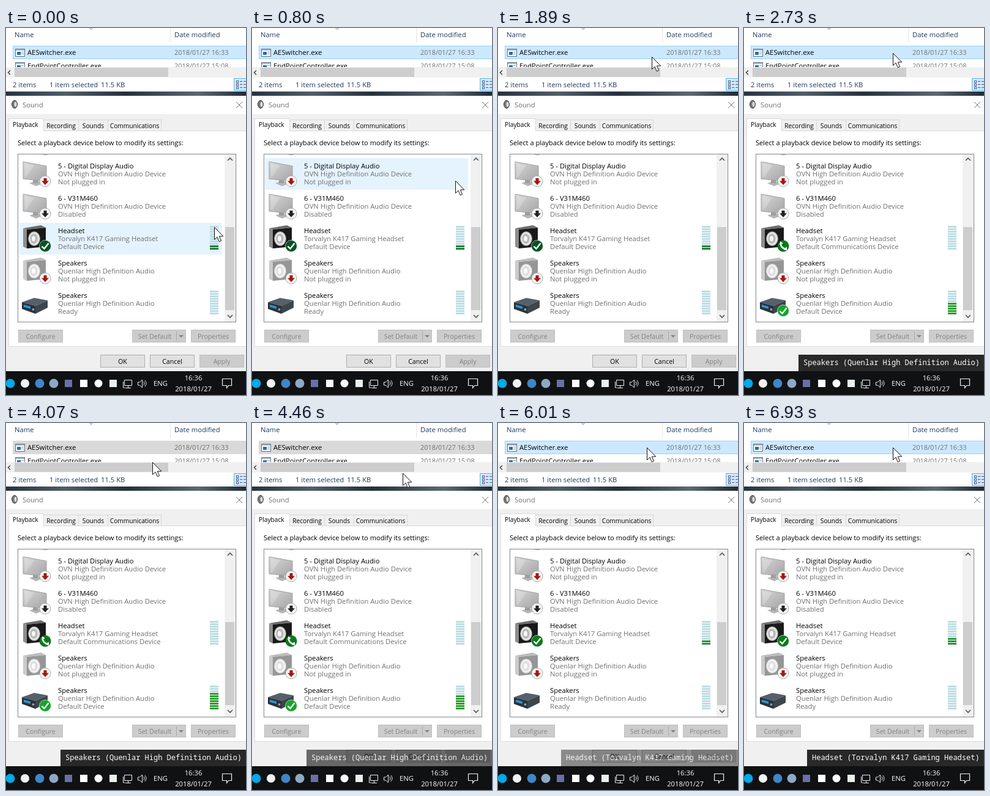
These frames come from a looping animation (392x601 px, 7080 ms). An HTML page:

```html
<!DOCTYPE html>
<html lang="en">
<head>
<meta charset="utf-8">
<title>Sound devices</title>
<style>
html, body { margin: 0; width: 100%; height: 100%; overflow: hidden; background: #f0f0f0; }
svg { display: block; }
text { font: 11.25px "Open Sans", "Noto Sans", sans-serif; fill: #000; }
.gray { fill: #707070; }
.status { fill: #1e395b; }
.small { font-size: 10.6px; }
.tab { font-size: 10.2px; }
.date { font-size: 10.9px; }
.prompt { font-size: 11.1px; }
.mid { text-anchor: middle; }
.off { fill: #838383; }
.light { fill: #fff; }
.mono { font: 500 12px "Noto Sans Mono", "DejaVu Sans Mono", monospace; fill: #fff; }
</style>
</head>
<body>
<svg id="stage" width="392" height="601" viewBox="0 0 392 601"></svg>
<script>
const LOOP = 7080, TO_SPEAKERS = 2560, TO_HEADSET = 5920;
const HEADSET = "Torvalyn K417 Gaming Headset", SPEAKERS = "Quenlar High Definition Audio";
const DISPLAY = "OVN High Definition Audio Device";

const rect = (x, y, w, h, fill, more = "") =>
  `<rect x="${x}" y="${y}" width="${w}" height="${h}" fill="${fill}" ${more}/>`;
const box = (x, y, w, h, fill, stroke, more = "") =>
  rect(x + .5, y + .5, w - 1, h - 1, fill, `stroke="${stroke}" ${more}`);
const path = (d, fill, stroke = "none", more = "") =>
  `<path d="${d}" fill="${fill}" stroke="${stroke}" ${more}/>`;
const dot = (x, y, r, fill, more = "") => `<circle cx="${x}" cy="${y}" r="${r}" fill="${fill}" ${more}/>`;
const oval = (x, y, rx, ry, fill, more = "") =>
  `<ellipse cx="${x}" cy="${y}" rx="${rx}" ry="${ry}" fill="${fill}" ${more}/>`;
const text = (x, y, s, cls = "", id = "") => `<text x="${x}" y="${y}" class="${cls}" id="${id}">${s}</text>`;
const group = (s, more = "") => `<g ${more}>${s}</g>`;
const button = (x, y, w, label, off, labelX = x + w / 2) =>
  box(x, y, w, 21, off ? "#ccc" : "#e1e1e1", off ? "#bfbfbf" : "#adadad") +
  text(labelX, y + 15, label, "small mid" + (off ? " off" : ""));

// Device icons, relative to the top of their row
const monitor = path("M38 41l13-4 11 4-13 5z", "#b5b5b5") + path("M44 33h8v8h-8z", "#9d9d9d") +
  path("M28 6L66 13V38L28 34z", "url(#screen)", "#a0a0a0") +
  path("M31 9L46 12 33 31 31 31z", "#fff", "none", 'opacity=".22"');
const speaker = faded => group(
  path("M28 9L57 4 65 8 34 11z", "#6d6d6d") + path("M28 9L34 11V42L28 39z", "#8d8d8d") +
  path("M34 11L65 8V39L34 42z", "#191919") +
  oval(46, 26, 9.5, 11.5, "#e4e4e4", 'stroke="#888"') + oval(45.500, 26, 6, 8, "#b8b8b8") + oval(45, 26, 3, 4.500, "#f5f5f5"),
  faded ? 'opacity=".45"' : "");
const receiver = path("M26 24L46 17 68 21 48 30z", "#56606a") + path("M26 24L48 30V43L26 35z", "#2a323a") +
  path("M48 30L68 21V33L48 43z", "#3d454d") + path("M29 28L40 31V35L29 32z", "#2f93cf") + dot(44.5, 36, 2, "#8fa0ac");
const arrowBadge = color => dot(64, 38, 9, "#f6f6f6", 'stroke="#a9a9a9"') +
  path("M61.5 33h5v4.5h3.5L64 44 58 37.5h3.5z", color);
const checkBadge = id => group(dot(64, 38, 9.5, "currentColor", 'stroke="#fff" stroke-width=".6"') +
  path("M58.5 38.5l4 4 7-9", "none", "#fff", 'stroke-width="2.4"'), `id="${id}"`);
const phoneBadge = group(dot(64, 38, 9.5, "#087a1c") +
  path("M60 34q0 7 8 9", "none", "#fff", 'stroke-width="2.6"') +
  path("M59 36l1-4 3 2M65 43l4 1 0-4", "none", "#fff", 'stroke-width="2"'), 'id="phone"');

const rowY = i => 213 + 53 * i;
const device = (i, icon, name, model, state) =>
  group(icon, `transform="translate(0 ${rowY(i)})"`) + text(85, rowY(i) + 17, name) +
  text(85, rowY(i) + 30, model, "gray") + text(85, rowY(i) + 43, state, "gray", "state" + i);
const meter = (id, y) =>
  group([...Array(10).keys()].map(k => rect(333, y + 4 * k, 14, 3, "#bcdde3")).join(""), `id="${id}"`);
const file = (y, name, date) =>
  box(15, y - 10, 16, 13, "#fff", "#5f7080") + rect(16, y - 9, 14, 2, "#aebbc4") + rect(18, y - 5, 6, 5, "#1c70b8") +
  rect(25, y - 5, 4, 1, "#999") + rect(25, y - 2, 4, 1, "#999") + text(35, y, name) + text(275, y, date, "gray date");

const explorer = rect(0, 0, 392, 104, "#fff") +
  path("M135.500 -1l3.500 3.500 3.500-3.500", "none", "#777") +
  text(14, 15, "Name", "status") + text(275, 15, "Date modified", "status") +
  rect(268, 0, 1, 24, "#e5e5e5") +
  box(11, 29, 384, 22, "#cce8ff", "#99d1ff", 'id="fileRow"') +
  rect(11, 51, 381, 14, "#e5f3ff", 'id="nextRow"') +
  file(44, "AESwitcher.exe", "2018/01/27 16:33") + file(66, "EndPointController.exe", "2018/01/27 15:08") +
  rect(0, 64, 392, 40, "#fff") + rect(0, 64, 392, 17, "#f0f0f0") +
  rect(14, 65, 251, 15, "#cdcdcd") + path("M7 69.5L3.5 73 7 76.5", "none", "#444", 'stroke-width="1.5"') +
  text(11, 97, "2 items", "status") + text(71, 97, "1 item selected", "status") + text(155, 97, "11.5 KB", "status") +
  box(372, 82, 24, 21, "#cce8ff", "#5fb2ec") +
  [87, 92, 97].map(y => box(376, y - 1, 4, 4, "#fff", "#557") + rect(382, y, 4, 1, "#557") + rect(388, y, 4, 1, "#557")).join("") +
  rect(0, 104, 392, 7, "url(#desk)");

const dialog = rect(0, 111, 392, 451, "#f0f0f0") + rect(0, 111, 392, 30, "#fff") +
  oval(14, 125, 4.5, 6.5, "#777", 'stroke="#444"') + oval(15.5, 125, 2, 4, "#ddd") +
  text(27, 130, "Sound", "gray") + path("M376 121l10 10m0-10l-10 10", "none", "#777") +
  box(4, 168, 392, 354, "#fff", "#dcdcdc") +
  [[61, 58, "Recording"], [118, 49, "Sounds"], [166, 88, "Communications"]].map(([x, w, s]) =>
    box(x, 150, w, 19, "#f0f0f0", "#d9d9d9") + text(x + w / 2, 164, s, "tab mid")).join("") +
  path("M4.5 170V148.5H61.5V169", "#fff", "#d9d9d9") + text(11, 162, "Playback", "tab") +
  text(19, 192, "Select a playback device below to modify its settings:", "prompt") +
  box(19, 206, 357, 276, "#fff", "#828790") +
  group(dot(64, 199, 9, "#f6f6f6", 'stroke="#a9a9a9"'), 'clip-path="url(#list)"') +
  rect(21, 0, 332, 52, "#e5f3ff", 'id="hover"') +
  device(0, monitor + arrowBadge("#a8140f"), "5 - Digital Display Audio", DISPLAY, "Not plugged in") +
  device(1, monitor + arrowBadge("#222"), "6 - V31M460", DISPLAY, "Disabled") +
  device(2, speaker() + checkBadge("headsetCheck") + phoneBadge, "Headset", HEADSET, "") +
  device(3, speaker(true) + arrowBadge("#a8140f"), "Speakers", SPEAKERS, "Not plugged in") +
  device(4, receiver + checkBadge("speakerCheck"), "Speakers", SPEAKERS, "") +
  meter("headsetMeter", 324) + meter("speakerMeter", 430) +
  rect(357, 207, 18, 274, "#f0f0f0") + rect(358, 326, 15, 136, "#cdcdcd") +
  path("M362 217l4-4 4 4M362 470l4 4 4-4", "none", "#555", 'stroke-width="1.7"') +
  button(20, 494, 73, "Configure", true) + button(206, 494, 88, "Set Default", true, 243) +
  rect(278, 497, 1, 15, "#aaa") + path("M282 503h8l-4 4z", "#838383") + button(302, 494, 73, "Properties", true) +
  button(154, 535, 73, "OK") + button(235, 535, 73, "Cancel") + button(316, 535, 73, "Apply", true);

// Apps in the taskbar are plain dots and squares
const taskbar = rect(0, 562, 392, 39, "#101113") +
  dot(7, 582, 7.5, "#00a9e8") + dot(31, 582, 7, "#f2f2f2") + dot(55, 582, 7.5, "#3f86c6") + dot(78, 582, 7.5, "#8da9c4") +
  rect(96, 576, 12, 12, "#6a6fa8") + rect(121, 576, 12, 12, "#fff") + dot(151, 582, 6.5, "#fff") + rect(169, 576, 12, 12, "#e8f2ea") +
  path("M193.5 576.5h12v9h-12zM199.5 586v3M195 589.5h9M191.5 579v10h3", "none", "#eee") +
  path("M215.5 580h3l4-4v13l-4-4h-3z", "none", "#eee") +
  path("M225 579q2 3 0 6M227 577q4 5 0 10", "none", "#eee") +
  text(241, 586, "ENG", "light") + text(306, 577, "16:36", "light mid") + text(306, 595, "2018/01/27", "light mid") +
  path("M353.5 574.5h15v11h-5l-3 4v-4h-7z", "none", "#f2f2f2", 'stroke-width="1.2"');

const toast = group(rect(0, 535, 392, 27, "#1f1f1f", 'id="toastBox" opacity=".95"') +
  text(0, 552, "", "mono", "toastText"), 'id="toast"');
const cursor = path("M0 0V20L4.6 15.7 7.7 23.3 11 21.9 7.9 14.5H14.3z", "#fff", "#111", 'id="cursor"');

document.getElementById("stage").innerHTML = `<defs>
  <linearGradient id="screen" x2="1" y2="1"><stop stop-color="#d8d8d8"/><stop offset="1" stop-color="#a4a4a4"/></linearGradient>
  <linearGradient id="desk"><stop stop-color="#27333f"/><stop offset=".25" stop-color="#515d69"/><stop offset=".5" stop-color="#24303d"/><stop offset=".8" stop-color="#5c6872"/><stop offset="1" stop-color="#202b36"/></linearGradient>
  <clipPath id="list">${rect(20, 207, 337, 274, "#fff")}</clipPath></defs>` +
  explorer + dialog + taskbar + toast + cursor;
const $ = id => document.getElementById(id);

// [time, x, y] of the pointer tip and [time, lit bars] of each meter
const cursorKeys = [[0, 340, 326], [430, 340, 326], [800, 332, 250], [1120, 315, 154], [1810, 254, 52], [1890, 251, 47],
  [2130, 243, 41], [3840, 243, 41], [4070, 239, 64], [4460, 246, 82], [4930, 276, 43], [5240, 252, 40], [5380, 243, 40], [LOOP, 243, 40]];
const headsetLevels = [[0, 2], [110, 3], [430, 2], [1180, 3], [1500, 2], [TO_SPEAKERS, 0], [TO_HEADSET, 2], [6100, 3],
  [6390, 4], [6620, 3], [6700, 4], [6930, 3]];
const speakerLevels = [[0, 0], [TO_SPEAKERS, 3], [2730, 5], [2880, 6], [3050, 5], [3130, 6], [3200, 4], [3370, 6], [3440, 8],
  [3610, 7], [4250, 6], [4550, 7], [4780, 6], [5310, 5], [5550, 6], [TO_HEADSET, 0]];

const stepAt = (keys, t) => keys.findLast(k => k[0] <= t)[1];
const ramp = (t, from, to) => Math.min(1, Math.max(0, (t - from) / (to - from)));
function cursorAt(t) {
  const i = cursorKeys.findIndex(k => k[0] > t), a = cursorKeys[i - 1], b = cursorKeys[i], u = ramp(t, a[0], b[0]);
  return [1, 2].map(n => Math.round(a[n] + (b[n] - a[n]) * u));
}
const show = (id, on) => $(id).setAttribute("visibility", on ? "visible" : "hidden");
function setMeter(id, level, color) {
  [...$(id).children].forEach((bar, k) => bar.setAttribute("fill", k >= 10 - level ? color : "#bcdde3"));
}

function draw(t) {
  const [x, y] = cursorAt(t), onSpeakers = t >= TO_SPEAKERS && t < TO_HEADSET, late = t >= TO_HEADSET;
  $("cursor").setAttribute("transform", `translate(${x + .5} ${y + .5})`);

  show("hover", y >= 206);
  $("hover").setAttribute("y", rowY(Math.max(0, Math.floor((y - 213) / 53))));
  show("nextRow", y >= 51 && y < 64);
  const unfocused = t >= 3920 && t < 4700;
  $("fileRow").setAttribute("fill", unfocused ? "#d9d9d9" : "#cce8ff");
  $("fileRow").setAttribute("stroke", unfocused ? "#d9d9d9" : "#99d1ff");

  $("state2").textContent = onSpeakers ? "Default Communications Device" : "Default Device";
  $("state4").textContent = onSpeakers ? "Default Device" : "Ready";
  show("phone", onSpeakers);
  show("headsetCheck", !onSpeakers);
  show("speakerCheck", onSpeakers);
  $("headsetCheck").style.color = late ? "#087a1c" : "#075323";
  $("speakerCheck").style.color = "#16a52a";
  setMeter("headsetMeter", stepAt(headsetLevels, t), late ? "#2b9440" : "#1f7d38");
  setMeter("speakerMeter", stepAt(speakerLevels, t), "#2c9c32");

  const left = late ? 103 : 89;
  $("toast").setAttribute("opacity", late ? ramp(t, TO_HEADSET, 6100) : ramp(t, 2540, 2700) * (1 - ramp(t, 4380, 4640)));
  $("toastBox").setAttribute("x", left);
  $("toastText").setAttribute("x", left + 8);
  $("toastText").textContent = late ? `Headset (${HEADSET})` : `Speakers (${SPEAKERS})`;
}

const start = performance.now();
function tick() {
  draw((performance.now() - start) % LOOP);
  requestAnimationFrame(tick);
}
tick();
</script>
</body>
</html>
```
